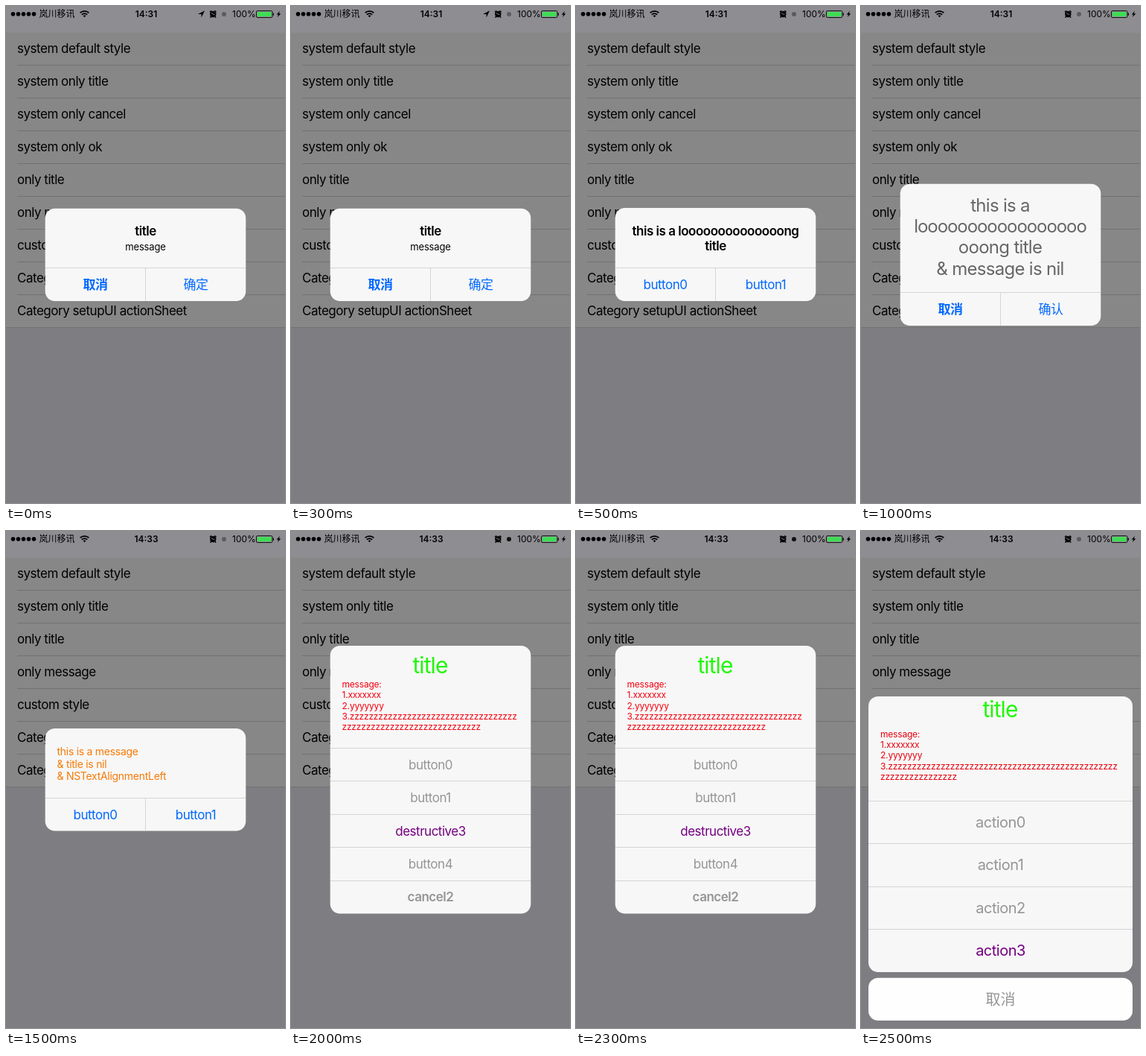
An HTML page that plays this animation: 375x667 px, repeating every 3000 ms.

```html
<!DOCTYPE html>
<html lang="en">
<head>
<meta charset="utf-8">
<title>Alert styles</title>
<style>
  html, body { margin: 0; width: 100%; height: 100%; overflow: hidden; background: #7e7e82; }
  svg { display: block; }
  text { font-family: Inter, "Noto Sans CJK SC", "Noto Sans CJK", sans-serif; }
</style>
</head>
<body>
<svg id="stage" width="375" height="667" viewBox="0 0 375 667"></svg>
<script>
const BLUE = '#0068ff', GRAY = '#959595', PURPLE = '#740080', GREEN = '#22f708';
const PANEL = '#f7f7f7', RULE = '#d5d5d8';

// Letter spacing per font size
const TRACKING = { 12: -0.2, 13: -0.13, 14: -0.28, 17: -0.48, 20: -0.5, 24: -0.7, 30: -0.9 };

const rect = (x, y, w, h, fill, r = 0) =>
  `<rect x="${x}" y="${y}" width="${w}" height="${h}" rx="${r}" fill="${fill}"/>`;

function text(str, x, y, { size = 17, fill = '#000', weight = 400, anchor = 'middle', spacing = TRACKING[size] } = {}) {
  const safe = str.replace(/&/g, '&amp;');
  return `<text x="${x}" y="${y}" font-size="${size}" font-weight="${weight}" fill="${fill}" ` +
    `text-anchor="${anchor}" letter-spacing="${spacing}">${safe}</text>`;
}

const lines = (list, x, y, step, style) =>
  list.map((str, i) => text(str, x, y + i * step, style)).join('');

function statusBar({ time, located, linked }) {
  const plain = { size: 12, anchor: 'start', spacing: 0 };
  let out = rect(0, 0, 375, 36, '#8d8d92');
  for (let i = 0; i < 5; i++) out += `<circle cx="${9.5 + 7 * i}" cy="10.7" r="2.8"/>`;
  out += text('岚川移讯', 44.5, 15, plain);
  out += '<g fill="none" stroke="#000" stroke-width="1.7">' +
    '<path d="M99.6 9.2a8.5 8.5 0 0 1 11.8 0M101.8 11.6a5.3 5.3 0 0 1 7.4 0"/></g>' +
    '<path d="M103.6 13.1a2.8 2.8 0 0 1 3.8 0L105.5 15.2z"/>';
  out += text(time, 188.5, 15, { size: 12, weight: 600, spacing: 0 });
  if (located) out += '<path d="M267 6.3L258 11h4.6v4.6z"/>';
  out += '<circle cx="278.3" cy="11" r="4.2"/>' +
    '<path d="M274 8.2l2.2-2M282.6 8.2l-2.2-2M275.6 14l-1 1.6M281 14l1 1.6" stroke="#000" stroke-width="1.5"/>' +
    '<path d="M276 9.4l2.3 1.8h2.2" fill="none" stroke="#8d8d92"/>';
  out += `<circle cx="293" cy="11" r="3" fill="${linked ? '#111' : '#5c5c60'}"/>`;
  out += text('100%', 304, 15, plain);
  out += '<rect x="336.5" y="6.5" width="21.5" height="9" rx="1.6" fill="none" stroke="#111"/>' +
    rect(338, 8, 18.5, 6, '#3fdc55') + rect(358.6, 9.2, 1.4, 3.6, '#111', 0.6) +
    '<path d="M368 6.8l-4.3 4.6h2.4l-1.2 3.6 4.5-4.8h-2.5z"/>';
  return out;
}

function table(rows) {
  const bottom = 36 + 44 * rows.length;
  let out = rect(0, 36, 375, bottom - 36, '#878787');
  rows.forEach((row, i) => {
    out += text(row, 15, 63 + 44 * i, { anchor: 'start' });
    if (i) out += rect(15, 35 + 44 * i, 360, 1, '#717174');
  });
  return out + rect(0, 35, 375, 1, '#717174') + rect(0, bottom - 1, 375, 1, '#717174');
}

const alertBox = (top, bottom) => rect(52.7, top, 269.6, bottom - top, PANEL, 13);

function buttonPair(ruleY, bottom, left, right, leftWeight = 400) {
  const y = ruleY + 28.5;
  return rect(53, ruleY, 269, 1, RULE) + rect(187, ruleY, 1, bottom - ruleY, RULE) +
    text(left, 120, y, { fill: BLUE, weight: leftWeight }) + text(right, 255, y, { fill: BLUE });
}

function buttonStack(x, width, ruleY, step, offset, size, items) {
  return items.map(([label, fill = GRAY, weight = 400], i) => {
    const y = ruleY + step * i;
    return rect(x, Math.round(y), width, 1, RULE) + text(label, 187.5, y + offset, { size, fill, weight });
  }).join('');
}

const details = (first, second) =>
  ['message:', '1.xxxxxxx', '2.yyyyyyy', '3.' + 'z'.repeat(first), 'z'.repeat(second)];

const title = (str, y) => text(str, 187.5, y, { weight: 600 });

const longRows = ['system default style', 'system only title', 'system only cancel', 'system only ok',
  'only title', 'only message', 'custom style', 'Category setupUI alert', 'Category setupUI actionSheet'];
const shortRows = longRows.filter(row => !/only (cancel|ok)$/.test(row));

const early = located => table(longRows) + statusBar({ time: '14:31', located });
const late = linked => table(shortRows) + statusBar({ time: '14:33', linked });

const scenes = [
  early(true) + alertBox(271.7, 396) + title('title', 308) +
    text('message', 187.5, 327.5, { size: 13 }) +
    buttonPair(351, 396, '取消', '确定', 700),

  early() + alertBox(271, 396) +
    title('this is a l' + 'o'.repeat(14) + 'ng', 308) + title('title', 328) +
    buttonPair(351, 396, 'button0', 'button1'),

  early() + alertBox(238.7, 429) +
    lines(['this is a', '', 'ooong title', '& message is nil'], 187, 275.5, 28.4, { size: 24, fill: '#666' }) +
    text('l' + 'o'.repeat(17), 187, 303.9, { size: 24, fill: '#666', spacing: -1.05 }) +
    buttonPair(384, 429, '取消', '确认', 700),

  late() + alertBox(265, 402.5) +
    lines(['this is a message', '& title is nil', '& NSTextAlignmentLeft'], 68.5, 301, 16.5,
      { size: 14, fill: '#f87a06', anchor: 'start' }) +
    buttonPair(358, 402.5, 'button0', 'button1'),

  late(true) + alertBox(154, 513.6) +
    text('title', 187, 190.5, { size: 30, fill: GREEN }) +
    lines(details(35, 29), 68.5, 210, 14.3, { size: 12, fill: '#f5000f', anchor: 'start' }) +
    buttonStack(53, 269, 291, 44.4, 28.8, 17,
      [['button0'], ['button1'], ['destructive3', PURPLE], ['button4'], ['cancel2', GRAY, 600]]),

  late() + rect(10, 222, 355, 370, PANEL, 13) +
    text('title', 187, 249.5, { size: 30, fill: GREEN }) +
    lines(details(48, 16), 26, 276.6, 14.3, { size: 12, fill: '#e6000f', anchor: 'start' }) +
    buttonStack(10, 355, 362, 57.4, 36, 20, [['action0'], ['action1'], ['action2'], ['action3', PURPLE]]) +
    rect(10, 599.7, 355, 57.3, '#fefefe', 13) +
    text('取消', 187.5, 636, { size: 20, fill: GRAY, weight: 500, spacing: 0 })
];

const stage = document.getElementById('stage');
let shown = -1;

function draw() {
  const index = Math.floor(performance.now() / 500) % scenes.length;
  if (index !== shown) stage.innerHTML = scenes[shown = index];
  requestAnimationFrame(draw);
}
draw();
</script>
</body>
</html>
```
